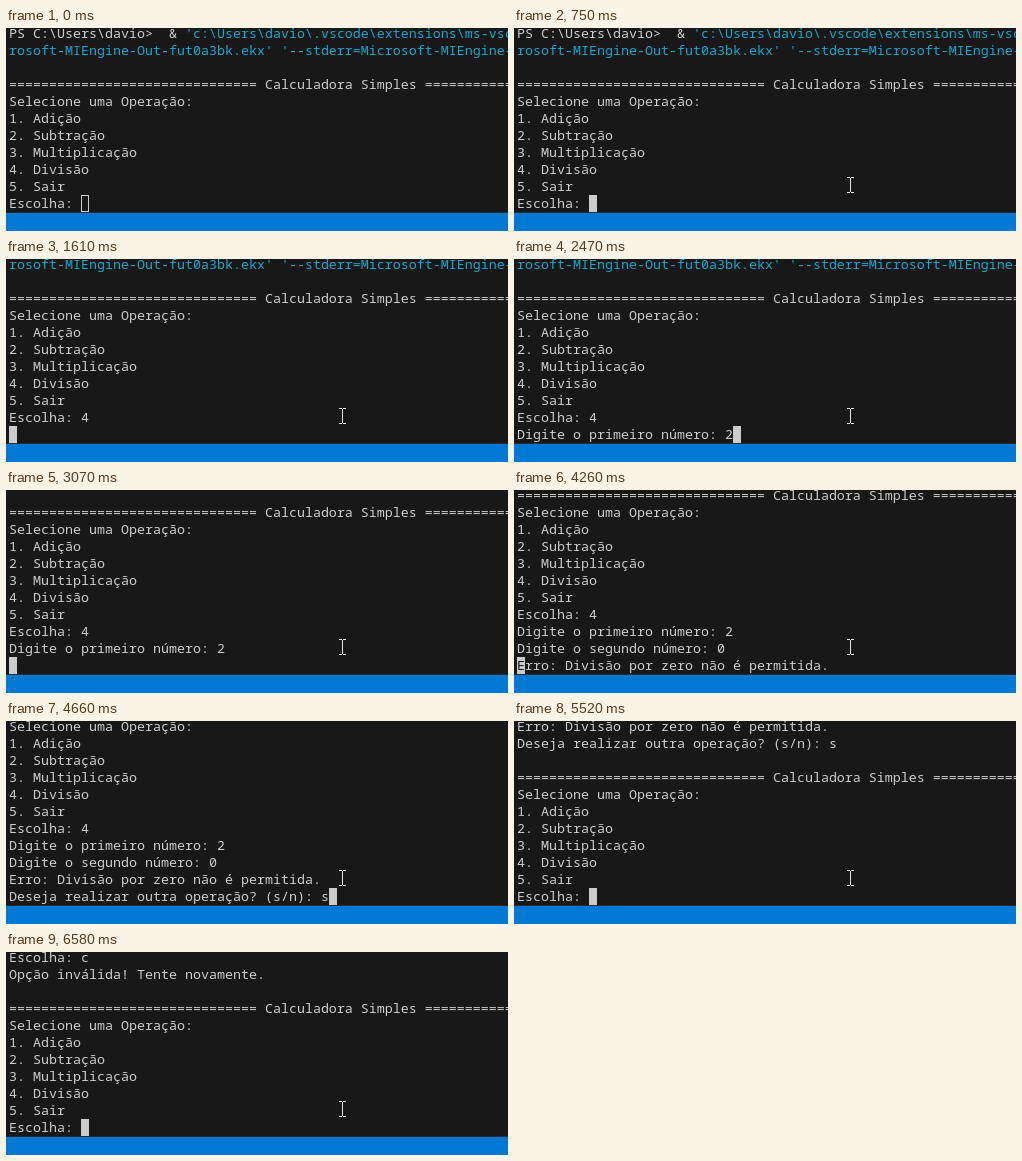
These frames come from a looping animation (502 by 203 pixels, 8 s). An HTML page with a canvas:

```html
<!DOCTYPE html>
<html lang="pt">
<head>
<meta charset="utf-8">
<title>Calculadora Simples</title>
<style>
html, body { margin: 0; width: 100%; height: 100%; overflow: hidden; background: #181818; }
#stage { position: relative; width: 502px; height: 203px; overflow: hidden; background: #181818; }
pre, #caret {
  position: absolute; margin: 0; color: #ccc; white-space: pre;
  font: 13.333px/17px "Noto Sans Mono", "DejaVu Sans Mono", monospace;
}
pre { left: 3px; top: -3px; }
pre div { height: 17px; }
pre span { color: #11a8cd; }
#caret { top: 167px; width: 8px; height: 17px; box-sizing: border-box; color: #181818; }
#caret.on { background: #ccc; }
#caret.off { border: 1px solid #ccc; }
canvas { position: absolute; left: 0; top: 0; }
</style>
</head>
<body>
<div id="stage">
  <pre id="screen"></pre>
  <div id="caret"></div>
  <canvas id="art" width="502" height="203"></canvas>
</div>
<script>
const LOOP = 8000, ROWS = 11, CELL = 8, LEFT = 3, FOCUS = 750;
const CYAN = '\x01'; // colours the rest of its line
const screenEl = document.getElementById('screen');
const caret = document.getElementById('caret');
const ctx = document.getElementById('art').getContext('2d');

const menu = '\n' + '='.repeat(31) + ' Calculadora Simples ' + '='.repeat(31) +
  '\nSelecione uma Operação:\n1. Adição\n2. Subtração\n3. Multiplicação' +
  '\n4. Divisão\n5. Sair\nEscolha: ';

const output = [
  [0, "PS C:\\Users\\davio>  & " + CYAN + "'c:\\Users\\davio\\.vscode\\extensions\\ms-vscode\n" +
      CYAN + "rosoft-MIEngine-Out-fut0a3bk.ekx' '--stderr=Microsoft-MIEngine-E\n" + menu],
  [1410, '4'],
  [1610, '\n'],
  [1680, 'Digite o primeiro número: '],
  [2470, '2'],
  [3070, '\n'],
  [3140, 'Digite o segundo número: '],
  [3800, '0'],
  [4260, '\nErro: Divisão por zero não é permitida.\r'],
  [4330, '\nDeseja realizar outra operação? (s/n): '],
  [4660, 's'],
  [5520, '\n' + menu],
  [6310, 'c'],
  [6580, '\nOpção inválida! Tente novamente.\n' + menu]
];

let shown = null;

function drawText(t) {
  const text = output.filter(e => e[0] <= t).map(e => e[1]).join('');
  if (text !== shown) {
    shown = text;
    const lines = text.split('\n').slice(-ROWS);
    screenEl.replaceChildren(...lines.map(line => {
      const row = document.createElement('div');
      const [plain, cyan] = line.replace('\r', '').split(CYAN);
      row.append(plain);
      if (cyan) {
        const span = document.createElement('span');
        span.textContent = cyan;
        row.append(span);
      }
      return row;
    }));
    const last = lines[ROWS - 1];
    const home = last.endsWith('\r');
    caret.style.left = LEFT + CELL * (home ? 0 : last.length) + 'px';
    caret.textContent = home ? last[0] : '';
  }
  caret.className = t < FOCUS ? 'off' : 'on';
}

function drawPointer(t) {
  if (t < 260) return;
  const step = Math.floor((t - 260) / 70);
  const p = 1 - Math.pow(1 - Math.min(step / 6, 1), 2);
  const x = Math.round(459 - 123 * p), y = Math.round(132 + 25 * p);
  ctx.fillStyle = '#e4e4e4';
  ctx.fillRect(x, y - 7, 1, 14);
  for (const end of [y - 8, y + 7]) {
    ctx.fillRect(x - 3, end, 3, 1);
    ctx.fillRect(x + 1, end, 3, 1);
  }
}

function frame(now) {
  const t = now % LOOP;
  drawText(t);
  ctx.clearRect(0, 0, 502, 203);
  ctx.fillStyle = '#2b2b2b';
  ctx.fillRect(0, 184, 502, 1);
  ctx.fillStyle = '#0078d4';
  ctx.fillRect(0, 185, 502, 18);
  drawPointer(t);
}

const start = performance.now();
function tick() {
  frame(performance.now() - start);
  requestAnimationFrame(tick);
}
tick();
</script>
</body>
</html>
```
